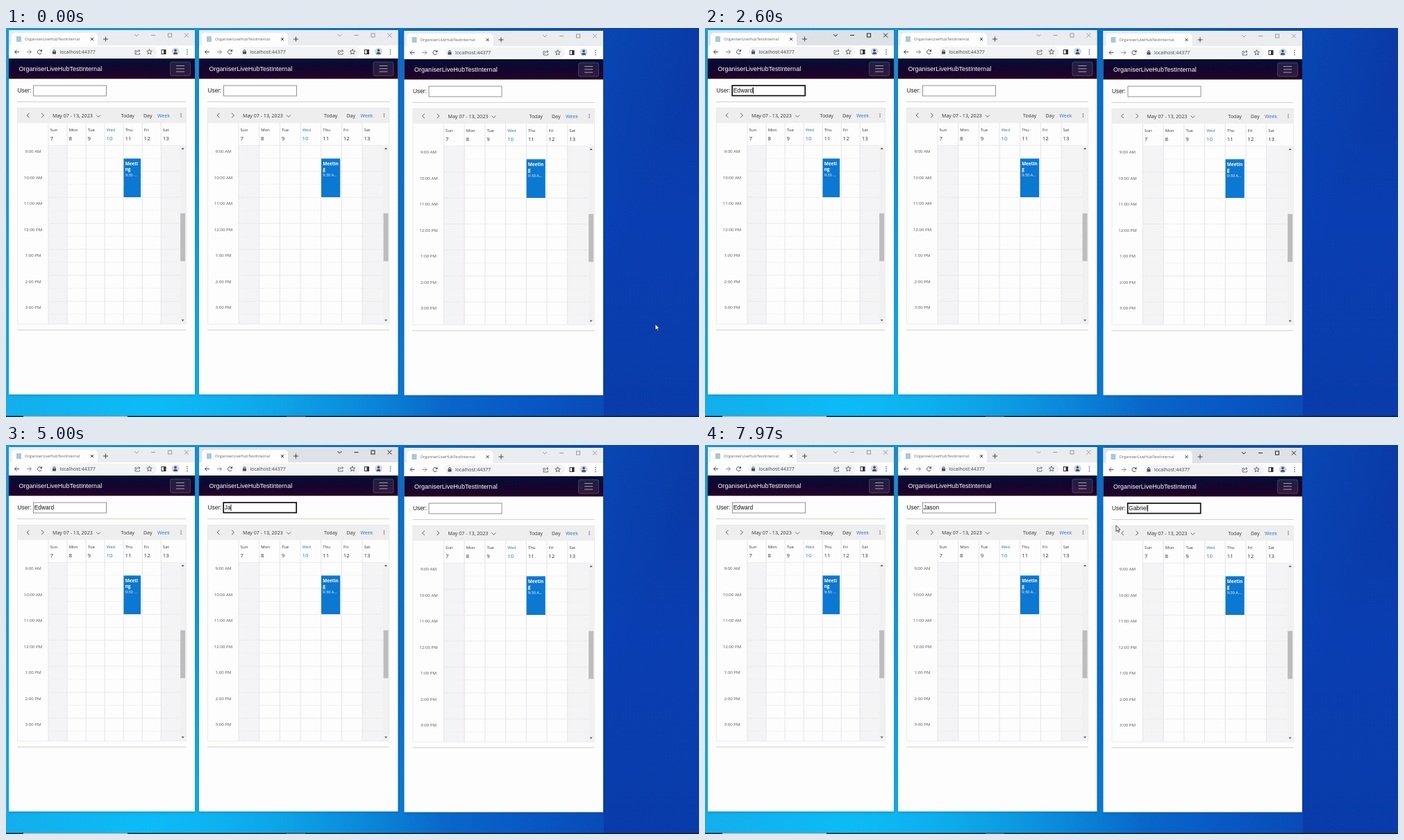
Recreate the animation shown at these times as an HTML page with a canvas. Size 998 by 561 pixels, loop 8000 ms.

```html
<!DOCTYPE html>
<html lang="en">
<head>
<meta charset="utf-8">
<title>Scheduler windows</title>
<style>
html, body { margin: 0; width: 100%; height: 100%; overflow: hidden; background: #0a50b4 }
canvas { display: block }
</style>
</head>
<body>
<canvas id="stage" width="998" height="561"></canvas>
<script>
const g = document.getElementById('stage').getContext('2d');
const SANS = '"Open Sans", "Noto Sans", sans-serif', ARIAL = '"Liberation Sans", Arial, sans-serif';
const APP = 'OrganiserLiveHubTestInternal';
const BLUE = '#2478c8';

// on: caret visible, keys: time of each typed letter
const windows = [
  { dx: 0, dy: 0, right: 272, active: [1200, 4230], focus: [1200, 3130], name: 'Edward',
    keys: [1870, 1900, 2230, 2230, 2570, 2600], on: [[1200, 1230], [1730, 2800]], meeting: ['Meeti', 'ng', '9:30 ...'] },
  { dx: 274, dy: 0, right: 290.5, active: [4230, 6230], focus: [4230, 6340], name: 'Jason',
    keys: [4500, 4970, 5030, 5100, 5170], on: [[4230, 5700]], meeting: ['Meetin', 'g', '9:30 A...'] },
  { dx: 569.5, dy: 1, right: 290.5, active: [6230, 8000], focus: [6230, 8000], name: 'Gabriel',
    keys: [6600, 6730, 6870, 7100, 7130, 7130, 7200], on: [[6230, 7430], [7960, 8000]], meeting: ['Meetin', 'g', '9:30 A...'] }
];
const mouse = [
  [30, 935, 427], [250, 760, 345], [500, 440, 225], [700, 225, 150], [830, 140, 121], [1030, 51, 91],
  [3130, 51, 91], [3131, 59, 98.5], [3700, 59, 98.5], [3850, 120, 108], [4000, 235, 112], [4200, 348, 86.5],
  [5430, 348, 86.5], [5560, 415, 115], [5730, 505, 105], [5900, 585, 100], [6070, 631, 92],
  [7730, 631, 92], [7850, 612, 106], [7960, 592, 116]
];
const hidden = [[1870, 3130], [4500, 5430], [6600, 7730]];
const within = (t, [a, b]) => t >= a && t < b;

function rect(x, y, w, h, color) {
  g.fillStyle = color;
  g.fillRect(x, y, w, h);
}
function round(x, y, w, h, r, color) {
  g.fillStyle = color;
  g.beginPath();
  g.roundRect(x, y, w, h, r);
  g.fill();
}
function box(x, y, w, h, color, width = 1) {
  g.strokeStyle = color;
  g.lineWidth = width;
  g.strokeRect(x, y, w, h);
}
function line(color, width, ...p) {
  g.strokeStyle = color;
  g.lineWidth = width;
  g.beginPath();
  for (let i = 0; i < p.length; i += 2) g.lineTo(p[i], p[i + 1]);
  g.stroke();
}
function arc(x, y, r, color, a = 0, b = 7) {
  g.strokeStyle = color;
  g.lineWidth = 1;
  g.beginPath();
  g.arc(x, y, r, a, b);
  g.stroke();
}
function dot(x, y, r, color) {
  g.fillStyle = color;
  g.beginPath();
  g.arc(x, y, r, 0, 7);
  g.fill();
}
function shape(color, ...p) {
  g.fillStyle = color;
  g.beginPath();
  for (let i = 0; i < p.length; i += 2) g.lineTo(p[i], p[i + 1]);
  g.closePath();
  g.fill();
}
// y is the vertical middle of the capitals
function text(s, x, y, size, color, font = SANS, weight = 400, align = 'left') {
  g.font = `${weight} ${size}px ${font}`;
  g.textAlign = align;
  g.fillStyle = color;
  g.fillText(s, x, y + size * .36);
}
function gradient(x0, y0, x1, y1, ...colors) {
  const f = g.createLinearGradient(x0, y0, x1, y1);
  colors.forEach((c, i) => f.addColorStop(i / (colors.length - 1), c));
  return f;
}

function desktop() {
  rect(0, 0, 998, 561, gradient(0, 0, 998, 0, '#1a9fe0', '#1698dd', '#0a78d0', '#0858c4', '#0a3aa8'));
  const glow = g.createRadialGradient(200, 560, 0, 200, 560, 430);
  glow.addColorStop(0, '#0cbcf6');
  glow.addColorStop(1, '#0cbcf600');
  rect(0, 0, 998, 561, glow);
  rect(861, 0, 137, 561, gradient(861, 0, 998, 60, '#0848b4', '#0a38a4'));
  rect(861, 0, 137, 561, gradient(0, 0, 0, 561, '#0846bc00', '#0846c470', '#0846bc40'));
  rect(0, 559.5, 998, 1.5, '#0b2236');
  rect(25, 559.5, 150, 1.5, '#b9cbd6');
  rect(404, 559.5, 27, 1.5, '#4a6472');
}

function chrome(R, active) {
  const ink = active ? '#222' : '#999', icon = '#4c4f53';
  rect(4, 3, R - 4, 23, active ? '#dee1e6' : '#eaecef');
  round(8, 7, 124, 20, [5, 5, 0, 0], '#fdfdfd');
  rect(15, 12, 7, 8, '#a9c8d8');
  text(APP, 27, 16, 5.7, '#666');
  line('#333', 1, 122, 14, 126, 18);
  line('#333', 1, 126, 14, 122, 18);
  line('#444', 1, 140, 16, 147, 16);
  line('#444', 1, 143.5, 12.5, 143.5, 19.5);
  line(ink, 1, R - 87, 9, R - 84, 12, R - 81, 9);
  line(ink, 1, R - 63, 10.5, R - 57, 10.5);
  box(R - 38.5, 8, 5, 5, ink);
  line(ink, 1, R - 15, 7.5, R - 9, 13.5);
  line(ink, 1, R - 9, 7.5, R - 15, 13.5);

  rect(4, 25, R - 4, 19, '#fdfdfd');
  line(icon, 1, 19, 34.5, 12.5, 34.5);
  line(icon, 1, 15.5, 31.5, 12.5, 34.5, 15.5, 37.5);
  line('#8a8d90', 1, 30, 34.5, 36.5, 34.5);
  line('#8a8d90', 1, 33.5, 31.5, 36.5, 34.5, 33.5, 37.5);
  arc(48.5, 34.5, 3, icon, .4, 5.5);
  shape(icon, 52, 30.5, 52, 34, 48.8, 34);
  round(63, 27, R - 118, 15, 7.5, '#f1f3f4');
  rect(67, 33.5, 5, 4, icon);
  arc(69.5, 33, 1.5, icon, Math.PI, 2 * Math.PI);
  text('localhost:44377', 77.5, 34.5, 7, '#444');

  line('#666', .9, R - 84, 32.5, R - 86, 32.5, R - 86, 38, R - 79.5, 38, R - 79.5, 36);
  line('#666', .9, R - 84.5, 36, R - 83, 33, R - 79, 33);
  line('#666', .9, R - 81, 31, R - 79, 33, R - 81, 35);
  const star = [];
  for (let i = 0; i <= 10; i++) {
    const a = i * Math.PI / 5, r = i % 2 ? 1.8 : 4;
    star.push(R - 65.5 + r * Math.sin(a), 34.5 - r * Math.cos(a));
  }
  line('#555', .9, ...star);
  box(R - 48, 31.5, 6, 6, '#333');
  rect(R - 45, 31.5, 3, 6, '#333');
  dot(R - 28, 34, 5.5, '#cfd9e8');
  dot(R - 28, 32.3, 1.8, '#3a4a63');
  round(R - 31, 34.8, 6, 3, [3, 3, 0, 0], '#3a4a63');
  for (const y of [31.5, 34.5, 37.5]) dot(R - 11, y, .8, '#444');
}

function navbar(R) {
  rect(4, 44, R - 4, 29.3, gradient(0, 44, 0, 73, '#050e38', '#12062e', '#250328'));
  text(APP, 18.5, 58.5, 9.05, '#fff', ARIAL);
  g.beginPath();
  g.roundRect(R - 35.5, 49, 29, 20, 2.5);
  g.fillStyle = '#ffffff16';
  g.fill();
  g.strokeStyle = '#ffffff30';
  g.lineWidth = 1;
  g.stroke();
  for (const y of [54.5, 58.7, 63]) line('#a5a0ae', 1, R - 27, y, R - 15, y);
}

function userField(w, t) {
  const focused = within(t, w.focus);
  text('User:', 16.5, 90, 8.3, '#222', ARIAL);
  round(39, 82.5, 105.5, 15.5, 1, '#fff');
  if (focused) box(39.2, 83, 105, 14.6, '#101010', 1.7);
  else box(39.5, 83, 105, 15, '#858585', .9);
  const typed = w.name.slice(0, w.keys.filter(k => t >= k).length);
  text(typed, 40.7, 90, 8.4, '#111', ARIAL);
  if (w.on.some(s => within(t, s))) rect(40.7 + g.measureText(typed).width, 85.5, .9, 9.5, '#111');
}

function scheduler(w) {
  const R = w.right, end = R - 12.7, c0 = 61, c7 = R - 21.7, cw = (c7 - c0) / 7;
  const top = 169.3, bottom = 427, half = 18.73;
  line('#d2d1cc', 1, 16, 106.5, end, 106.5);
  line('#d2d1cc', 1, 16, 435.5, end, 435.5);

  rect(16.5, 115, end - 16.5, 22, '#efeeee');
  line('#555', .9, 33.5, 122.8, 30, 126, 33.5, 129.2);
  line('#555', .9, 51, 122.8, 54.5, 126, 51, 129.2);
  text('May 07 - 13, 2023', 67, 126, 7.1, '#333');
  line('#555', .9, 130, 125.5, 133, 128.5, 136, 125.5);
  text('Today', R - 106.5, 126, 7, '#333');
  text('Day', R - 74, 126, 7, '#333');
  text('Week', R - 54, 126, 7, BLUE);
  for (const y of [123.7, 126, 128.3]) dot(R - 20, y, .7, '#555');

  for (const i of [0, 6]) rect(c0 + i * cw, top, cw, bottom - top, '#f4f3f6');
  for (let k = 0; k < 14; k++) {
    const y = top + k * half;
    line(k % 2 ? '#f2f1f1' : '#e9e8ea', .9, c0, y, c7, y);
    if (k % 2 == 0) {
      const h = 9 + k / 2;
      text(`${h > 12 ? h - 12 : h}:00 ${h < 12 ? 'AM' : 'PM'}`, 39, y + 9, 6.1, '#555', SANS, 400, 'center');
    }
  }
  ['Sun', 'Mon', 'Tue', 'Wed', 'Thu', 'Fri', 'Sat'].forEach((day, i) => {
    const x = c0 + i * cw, color = i == 3 ? BLUE : '#333';
    line('#e4e3e6', .9, x, 137, x, bottom);
    text(day, x + 2.6, 146.5, 6, color);
    text(7 + i, x + 2.4, 159.5, 7.9, color);
  });
  box(16.5, 115.5, end - 16.5, bottom - 115.5, '#e6e5e5', .8);

  const x = c0 + 4 * cw + .3;
  rect(x, 188.3, cw - 2.5, 55.7, '#0b78d2');
  text(w.meeting[0], x + 2.2, 195.3, 6.4, '#fff', SANS, 700);
  text(w.meeting[1], x + 2.2, 203.3, 6.4, '#fff', SANS, 700);
  text(w.meeting[2], x + 2.2, 211.5, 5.6, '#fff');

  rect(c7, top, 8.5, bottom - top, '#f1f1f1');
  rect(c7 + .8, 267.3, 7, 69, '#bdbdbd');
  const m = c7 + 4.3;
  shape('#555', m - 2, 175, m, 172.5, m + 2, 175);
  shape('#555', m - 2, 420.5, m, 423, m + 2, 420.5);
}

function drawWindow(w, t) {
  g.save();
  g.translate(w.dx, w.dy);
  g.shadowColor = '#00284860';
  g.shadowBlur = 4;
  rect(4, 3, w.right - 4, 525.5, '#fdfdfd');
  g.shadowColor = 'transparent';
  chrome(w.right, within(t, w.active));
  navbar(w.right);
  userField(w, t);
  scheduler(w);
  g.restore();
}

function pointer(t) {
  if (hidden.some(s => within(t, s))) return;
  let i = mouse.findIndex(k => k[0] > t);
  if (i < 0) i = mouse.length;
  const a = mouse[Math.max(i - 1, 0)], b = mouse[Math.min(i, mouse.length - 1)];
  const f = a === b ? 0 : (t - a[0]) / (b[0] - a[0]);
  const x = a[1] + (b[1] - a[1]) * f, y = a[2] + (b[2] - a[2]) * f;
  g.save();
  g.translate(x, y);
  if (windows.some(w => x > w.dx + 39 && x < w.dx + 145 && y > 81 && y < 100)) {
    line('#222', .9, 0, -4, 0, 4);
    for (const e of [-4, 4]) line('#222', .9, -1.8, e, 1.8, e);
  } else {
    const p = [0, 0, 0, 8.6, 2, 6.8, 3.4, 9.8, 4.7, 9.2, 3.4, 6.3, 6, 6.1, 0, 0];
    shape('#fff', ...p);
    line('#222', .8, ...p);
  }
  g.restore();
}

function frame() {
  const t = performance.now() % 8000;
  desktop();
  for (const w of windows) drawWindow(w, t);
  pointer(t);
  requestAnimationFrame(frame);
}
frame();
</script>
</body>
</html>
```
